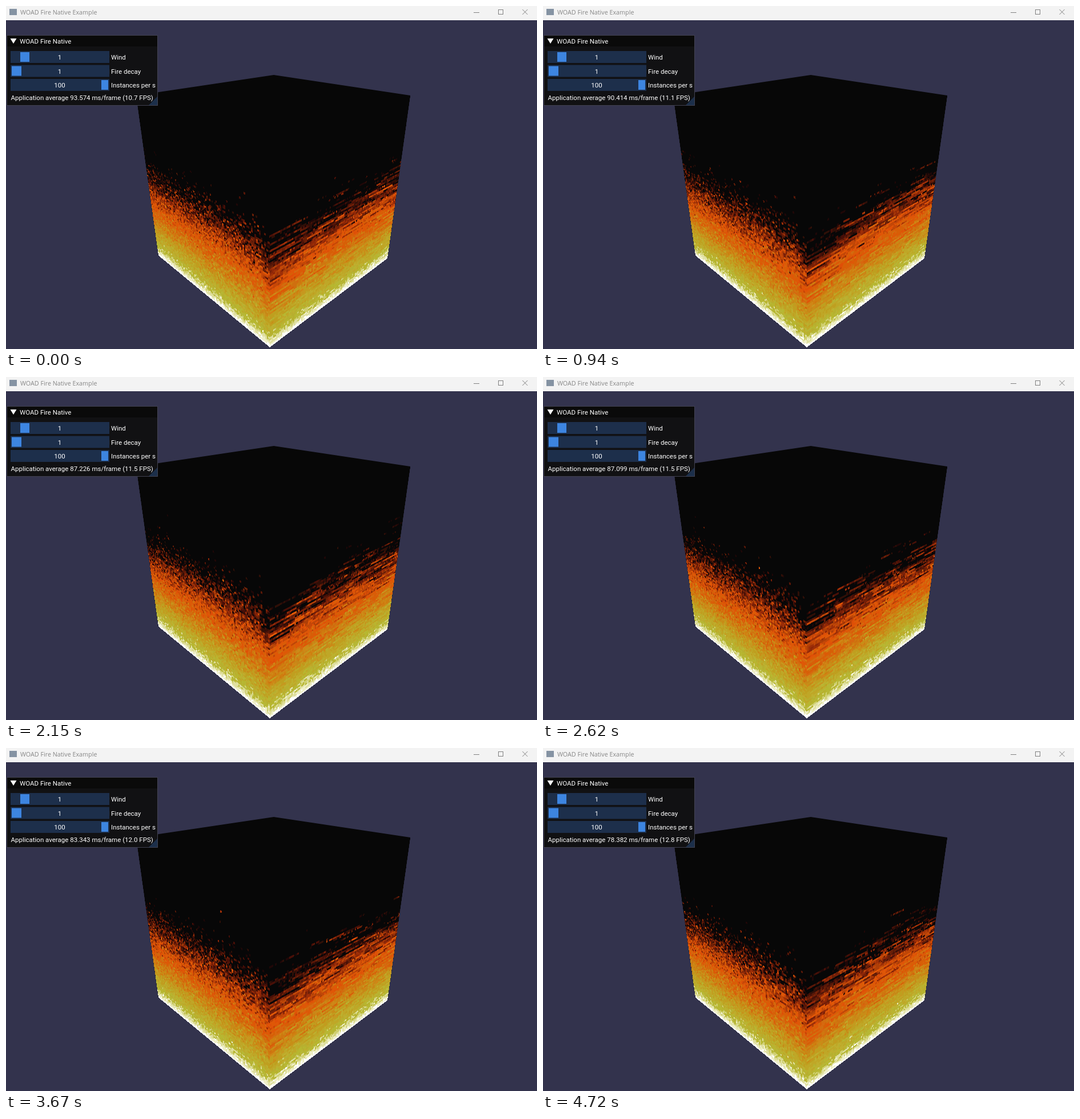
An HTML page with a canvas for the animation above (4760 ms loop, 930x602 px).

```html
<!DOCTYPE html>
<html lang="en">
<head>
<meta charset="utf-8">
<title>Fire cube</title>
<style>
  html, body { margin: 0; width: 100%; height: 100%; overflow: hidden; background: #33334d; }
  canvas { display: block; }
</style>
</head>
<body>
<canvas id="stage" width="930" height="602"></canvas>
<script>
const ctx = document.getElementById('stage').getContext('2d');
const LOOP = 4760, CELLS = 100, ROWS = 84, HOTTEST = 36, DECAY = 0.64;

// [time, number of equal steps until the next entry]
const TEMPO = [[0, 1], [70, 7], [570, 1], [640, 4], [940, 2], [1080, 1], [1180, 5],
  [1520, 1], [1590, 1], [1690, 1], [1750, 5], [2150, 1], [2220, 1], [2280, 4], [2620, 2],
  [2750, 1], [2850, 6], [3330, 1], [3400, 3], [3670, 1], [3730, 2], [3870, 1], [3970, 6],
  [4420, 1], [4560, 2], [4720, 1]];
const stepTimes = TEMPO.flatMap(([start, count], i) => {
  const end = i + 1 < TEMPO.length ? TEMPO[i + 1][0] : LOOP;
  return Array.from({ length: count }, (_, k) => start + Math.round((end - start) * k / count / 10) * 10);
});

const AVERAGES = [[0, 93.574], [940, 90.414], [1520, 88.384], [2150, 87.226],
  [2620, 87.099], [3670, 83.343], [4720, 78.382]];
function averageAt(time) {
  const i = Math.min(AVERAGES.findLastIndex(([t]) => t <= time), AVERAGES.length - 2);
  const [[t0, a], [t1, b]] = AVERAGES.slice(i, i + 2);
  return a + (b - a) * (time - t0) / (t1 - t0);
}

const PALETTE = ('070707 1f0707 2f0f07 470f07 571707 671f07 771f07 8f2707 9f2f07 af3f07 ' +
  'bf4707 c74707 df4f07 df5707 df5707 d75f07 d75f07 d7670f cf6f0f cf770f cf7f0f cf8717 ' +
  'c78717 c78f17 c7971f bf9f1f bf9f1f bfa727 bfa727 bfaf2f b7af2f b7b72f b7b737 cfcf6f ' +
  'dfdf9f efefc7 ffffff').split(' ').map(hex => {
    const n = parseInt(hex, 16);
    return (255 << 24 | (n & 255) << 16 | (n & 0xff00) | n >> 16) >>> 0;
  });

let seed = 20817;
function random() {
  seed = (Math.imul(seed, 1664525) + 1013904223) >>> 0;
  return seed / 4294967296;
}

function newFire(width) {
  const heat = new Uint8Array(width * ROWS);
  heat.fill(HOTTEST, 0, width);
  return { width, heat };
}

function spread({ width, heat }, decayAt) {
  for (let y = ROWS - 1; y > 0; y--) {
    for (let x = 0; x < width; x++) {
      const from = Math.min(width - 1, Math.max(0, x + 1 - Math.floor(random() * 4)));
      const warm = heat[(y - 1) * width + from];
      heat[y * width + x] = Math.max(0, warm - (random() < decayAt(x) ? 1 : 0));
    }
  }
}

// Wind blows along the right face and into the left one, so the left shows the ends of many thin sheets.
const cornerDecay = distance => DECAY + 0.06 * Math.max(0, 1 - distance / 12);
const rightFire = newFire(CELLS);
const sheets = Array.from({ length: CELLS }, () => newFire(3));

function advance() {
  spread(rightFire, cornerDecay);
  sheets.forEach((sheet, i) => spread(sheet, () => cornerDecay((CELLS - 1 - i) * 2)));
}

function snapshot() {
  const cells = new Uint8Array(2 * CELLS * CELLS);
  for (let y = 0; y < ROWS; y++) {
    for (let x = 0; x < CELLS; x++) {
      cells[y * CELLS + x] = sheets[x].heat[y * 3 + 1];
      cells[(CELLS + y) * CELLS + x] = rightFire.heat[y * CELLS + x];
    }
  }
  return cells;
}

for (let i = 0; i < 90; i++) advance();
const states = stepTimes.map(() => { advance(); return snapshot(); });

const TOP_LEFT = [228, 157], TOP_BACK = [469, 121], TOP_RIGHT = [708, 157], TOP_FRONT = [461, 227];
const LOW_LEFT = [267, 438], LOW_RIGHT = [668, 443], LOW_FRONT = [462, 599];

// Maps a screen point to (u, v) on a quad seen in perspective; corners run from u,v = 0,0 through 1,0 and 1,1 to 0,1.
function unproject([a, b, c, d]) {
  const dx1 = b[0] - c[0], dx2 = d[0] - c[0], sx = a[0] - b[0] + c[0] - d[0];
  const dy1 = b[1] - c[1], dy2 = d[1] - c[1], sy = a[1] - b[1] + c[1] - d[1];
  const det = dx1 * dy2 - dx2 * dy1;
  const g = (sx * dy2 - dx2 * sy) / det, h = (dx1 * sy - sx * dy1) / det;
  const ux = b[0] - a[0] + g * b[0], vx = d[0] - a[0] + h * d[0];
  const uy = b[1] - a[1] + g * b[1], vy = d[1] - a[1] + h * d[1];
  return (x, y) => {
    const p = ux - g * x, q = vx - h * x, r = x - a[0];
    const s = uy - g * y, t = vy - h * y, w = y - a[1];
    const k = p * t - q * s;
    return [(r * t - q * w) / k, (p * w - r * s) / k];
  };
}

const BOX = { x: 228, y: 157, w: 481, h: 443 };
const faces = [
  unproject([LOW_LEFT, LOW_FRONT, TOP_FRONT, TOP_LEFT]),
  unproject([LOW_FRONT, LOW_RIGHT, TOP_RIGHT, TOP_FRONT])
];
const lookup = new Int32Array(BOX.w * BOX.h).fill(-1);
for (let i = 0; i < lookup.length; i++) {
  const x = BOX.x + i % BOX.w + 0.5, y = BOX.y + Math.floor(i / BOX.w) + 0.5;
  faces.forEach((locate, face) => {
    const [u, v] = locate(x, y);
    if (u >= 0 && u < 1 && v >= 0 && v < 1) {
      lookup[i] = (face * CELLS + Math.floor(v * CELLS)) * CELLS + Math.floor(u * CELLS);
    }
  });
}

const layer = document.createElement('canvas');
layer.width = BOX.w;
layer.height = BOX.h;
const layerCtx = layer.getContext('2d');
const image = layerCtx.createImageData(BOX.w, BOX.h);
const pixels = new Uint32Array(image.data.buffer);

function box(color, x, y, w, h) {
  ctx.fillStyle = color;
  ctx.fillRect(x, y, w, h);
}

function polygon(color, points) {
  ctx.fillStyle = color;
  ctx.beginPath();
  points.forEach(p => ctx.lineTo(...p));
  ctx.fill();
}

function label(text, x, y, align = 'left') {
  ctx.fillStyle = '#fff';
  ctx.font = '11.5px Roboto, sans-serif';
  ctx.textAlign = align;
  ctx.fillText(text, x, y);
}

function drawCube(cells) {
  polygon('#070707', [TOP_LEFT, TOP_BACK, TOP_RIGHT, LOW_RIGHT, LOW_FRONT, LOW_LEFT]);
  lookup.forEach((cell, i) => { pixels[i] = cell < 0 ? 0 : PALETTE[cells[cell]]; });
  layerCtx.putImageData(image, 0, 0);
  ctx.drawImage(layer, BOX.x, BOX.y);
}

function drawTitleBar() {
  box('#f3f3f3', 0, 0, 930, 25);
  box('#8593a3', 6, 5, 13, 11);
  ctx.fillStyle = '#868686';
  ctx.font = '10.75px "Open Sans", sans-serif';
  ctx.textAlign = 'left';
  ctx.fillText('WOAD Fire Native Example', 25, 15);
  ctx.strokeStyle = '#808080';
  ctx.lineWidth = 1;
  ctx.strokeRect(862.5, 6.5, 8, 8);
  ctx.beginPath();
  ctx.moveTo(819, 11.5); ctx.lineTo(829, 11.5);
  ctx.moveTo(904.5, 6); ctx.lineTo(913.5, 15);
  ctx.moveTo(913.5, 6); ctx.lineTo(904.5, 15);
  ctx.stroke();
}

function drawSlider(name, value, y, grabX, grabWidth) {
  box('#1d2f4b', 8, y, 173, 21);
  box('#3d85e0', grabX, y + 2, grabWidth, 17);
  label(value, 94, y + 15, 'center');
  label(name, 184, y + 15);
}

function drawPanel(average) {
  box('#414150', 1, 51, 265, 124);
  box('#111113', 2, 52, 263, 122);
  box('#0a0a0a', 2, 52, 263, 19);
  polygon('#fff', [[7.5, 57], [18.5, 57], [13, 66]]);
  label('WOAD Fire Native', 24, 66);
  drawSlider('Wind', '1', 79, 25, 16);
  drawSlider('Fire decay', '1', 103.5, 10, 17);
  drawSlider('Instances per s', '100', 128, 167, 12);
  polygon('#1c2f4a', [[265, 159], [265, 174], [250, 174]]);
  label(`Application average ${average.toFixed(3)} ms/frame (${(1000 / average).toFixed(1)} FPS)`, 8.5, 164.5);
}

let shown = -1;
function draw(now) {
  const time = now % LOOP;
  const step = stepTimes.findLastIndex(t => t <= time);
  if (step !== shown) {
    shown = step;
    box('#33334d', 0, 0, 930, 602);
    drawCube(states[step]);
    drawTitleBar();
    drawPanel(averageAt(stepTimes[step]));
  }
  requestAnimationFrame(draw);
}

const begin = performance.now();
draw(0);
function tick() { return performance.now() - begin; }
</script>
</body>
</html>
```
